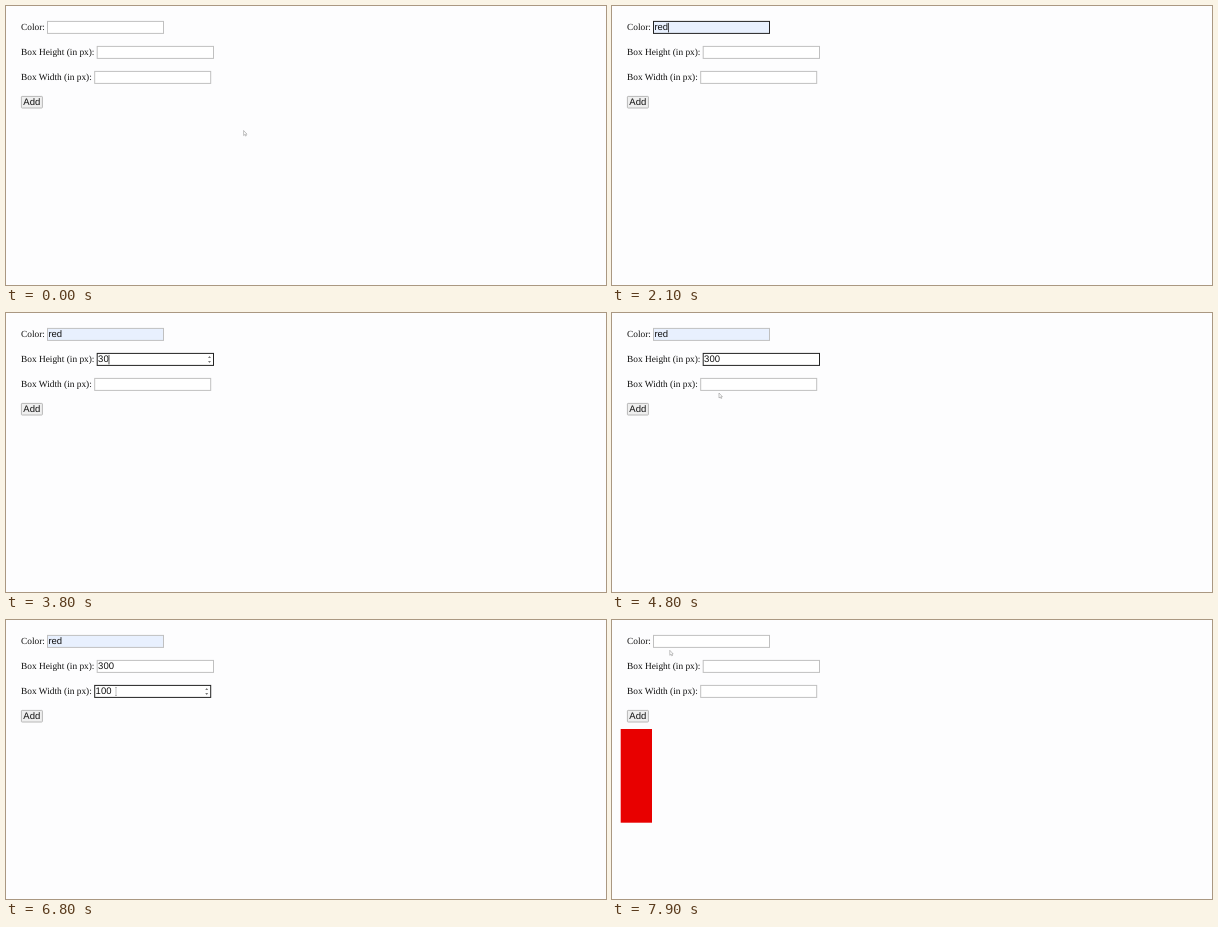
Write an HTML page that moves like this. It is 600 by 279 pixels and loops after 8 s.

```html
<!DOCTYPE html>
<html lang="en">
<head>
<meta charset="utf-8">
<title>Box form</title>
<style>
  html, body { margin: 0; width: 100%; height: 100%; overflow: hidden; background: #fdfdfe; }
  svg { display: block; }
  text { font: 9.35px "Liberation Serif", Times, serif; fill: #111; white-space: pre; text-rendering: geometricPrecision; }
  .ui { font: 9.5px "Liberation Sans", Arial, sans-serif; }
</style>
</head>
<body>
<svg id="stage" width="600" height="279" viewBox="0 0 600 279"></svg>
<script>
const LOOP = 8000;
const stage = document.getElementById('stage');

function add(tag, attrs, content = '') {
  const el = document.createElementNS('http://www.w3.org/2000/svg', tag);
  set(el, attrs);
  el.textContent = content;
  return stage.appendChild(el);
}
function set(el, attrs) {
  for (const name in attrs) el.setAttribute(name, attrs[name]);
}
const show = (el, on) => set(el, { visibility: on ? 'visible' : 'hidden' });

// Last entry of [time, ...values] that has started
const at = (steps, t) => steps.filter(s => s[0] <= t).pop();
const within = (spans, t) => spans.some(([a, b]) => t >= a && t < b);

const box = add('rect', { x: 8.7, y: 109, width: 31.3, height: 93.7, fill: '#e80000' });

const fields = [
  {
    label: 'Color:', x: 41.5, y: 15.4, w: 116,
    text: [[0, ''], [1800, 'r'], [1900, 're'], [2000, 'red'], [7400, '']],
    focus: [[1200, 2600]], hover: [[900, 1200]], spin: [],
    caret: [[1200, 1400], [1800, 2600]], filled: [[2000, 7400]]
  },
  {
    label: 'Box Height (in px):', x: 91.2, y: 40.4, w: 116.3,
    text: [[0, ''], [3300, '3'], [3800, '30'], [3900, '300'], [7400, '']],
    focus: [[2600, 5000]], hover: [], spin: [[2300, 4700]],
    caret: [[2600, 2900], [3100, 4600]], filled: []
  },
  {
    label: 'Box Width (in px):', x: 88.7, y: 65.4, w: 116,
    text: [[0, ''], [5700, '1'], [5900, '10'], [6100, '100'], [7400, '']],
    focus: [[5000, 7200]], hover: [], spin: [[4900, 6900]],
    caret: [[5000, 6300]], filled: []
  }
];

for (const f of fields) {
  const { x, y, w } = f, s = x + w - 4;
  add('text', { x: 15, y: y + 8.8 }, f.label);
  f.frame = add('rect', { x, y, width: w, height: 12 });
  f.value = add('text', { x: x + 0.9, y: y + 8.9, class: 'ui' });
  f.bar = add('rect', { y: y + 1.5, width: 0.8, height: 9.5, fill: '#222' });
  f.arrows = add('path', {
    d: `M${s - 1.5} ${y + 4.5}l1.5-2 1.5 2zM${s - 1.5} ${y + 7.5}l1.5 2 1.5-2z`, fill: '#777'
  });
}

const button = add('rect', { x: 15.4, y: 90.4, width: 21, height: 11.6, rx: 0.7 });
add('text', { x: 17.3, y: 99.4, class: 'ui' }, 'Add');

const shapes = {
  arrow: add('path', { d: 'M0 0V5L1.2 4 2 5.6 2.7 5.2 2 3.7H3.4Z' }),
  beam: add('path', { d: 'M-1 0H1M0 0V8M-1 8H1' }),
  hand: add('path', { d: 'M0 0.4Q.6-.3 1.1.4V2.2L3.5 2.8V4.8L2.8 6.2H.5L-1.2 3.6 0 3.8Z' })
};
for (const k in shapes) set(shapes[k], { fill: '#fff', stroke: '#999', 'stroke-width': 0.6 });

const pointer = [
  [0, 'arrow', 237.6, 124.5], [100, 'arrow', 228, 121], [200, 'arrow', 172, 102],
  [300, 'arrow', 114, 87], [400, 'arrow', 97, 84],
  [600, 'arrow', 91, 72], [700, 'arrow', 77, 48], [800, 'arrow', 67, 29],
  [900, 'beam', 63, 17.5], [1200, ''],
  [2200, 'arrow', 80, 32], [2300, 'beam', 106, 42], [2700, ''],
  [4100, 'arrow', 102, 56.5], [4600, 'arrow', 104, 72], [4700, 'arrow', 106, 88],
  [4800, 'arrow', 107, 80], [4900, 'beam', 107, 67.5], [5200, ''],
  [6800, 'beam', 110, 67.5], [6900, 'arrow', 86, 79], [7000, 'arrow', 58, 88],
  [7100, 'arrow', 38, 93], [7200, 'arrow', 28, 95], [7300, 'hand', 26.5, 94.5],
  [7600, 'arrow', 30, 88], [7700, 'arrow', 41, 63], [7800, 'arrow', 52, 42],
  [7900, 'arrow', 57.8, 30.3]
];

function draw(t) {
  for (const f of fields) {
    const focused = within(f.focus, t);
    set(f.frame, {
      fill: within(f.filled, t) ? '#e8f0fe' : '#fff',
      stroke: focused ? '#222' : within(f.hover, t) ? '#888' : '#c0c0c0'
    });
    const value = at(f.text, t)[1];
    if (f.value.textContent !== value) f.value.textContent = value;
    set(f.bar, { x: f.x + 0.8 + f.value.getComputedTextLength() });
    show(f.bar, within(f.caret, t));
    show(f.arrows, within(f.spin, t));
  }
  const hovered = t >= 7200 && t < 7600;
  set(button, { fill: hovered ? '#f4f4f4' : '#efefef', stroke: hovered ? '#c8c8c8' : '#b8b8b8' });
  show(box, t >= 7400);
  const [, kind, x, y] = at(pointer, t);
  for (const k in shapes) show(shapes[k], k === kind);
  if (kind) set(shapes[kind], { transform: `translate(${x} ${y})` });
}

let start;
function tick(now) {
  start ??= now;
  draw((now - start) % LOOP);
  requestAnimationFrame(tick);
}
draw(0);
requestAnimationFrame(tick);
</script>
</body>
</html>
```
